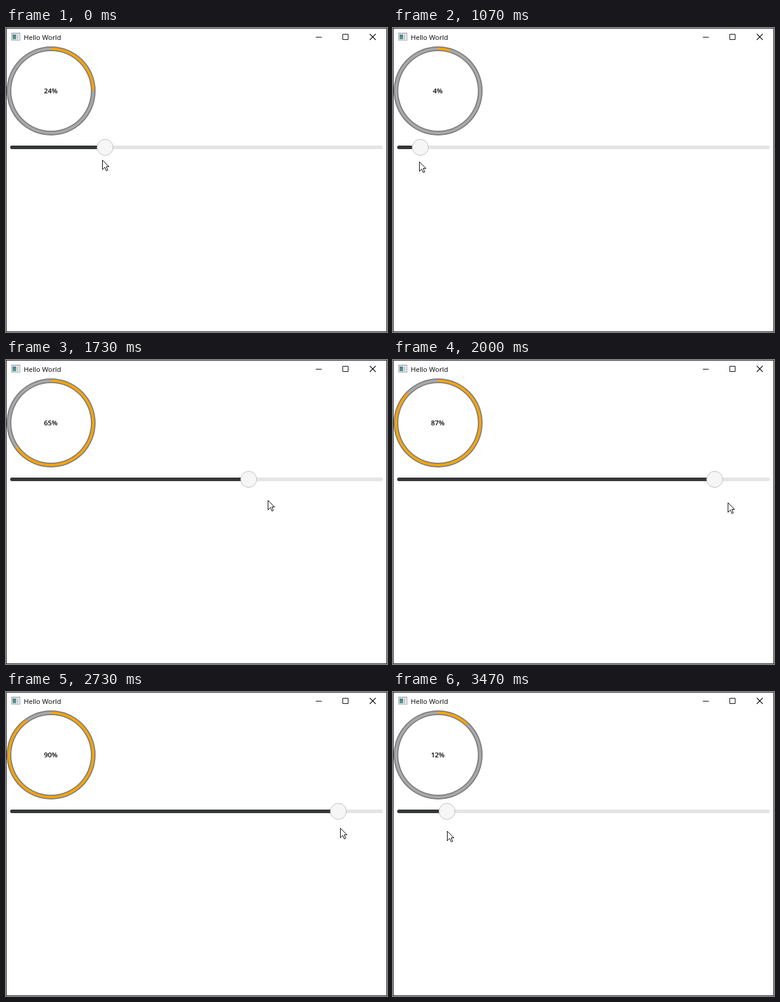
Write an HTML page that moves like this. It is 642 by 512 pixels and loops after 5140 ms.

```html
<!DOCTYPE html>
<html lang="en">
<head>
<meta charset="utf-8">
<title>Hello World</title>
<style>
  html, body { margin: 0; width: 100%; height: 100%; overflow: hidden; background: #fff; }
  #stage { position: absolute; left: 0; top: 0; width: 642px; height: 512px; overflow: hidden; background: #fff; }
  #stage > * { position: absolute; }
  svg { left: 0; top: 0; overflow: visible; }
  .title { left: 30px; top: 8px; font: 11.5px/16px "Open Sans", sans-serif; color: #000; white-space: pre; }
  .ring { left: 1px; top: 31px; width: 150px; height: 150px; border-radius: 50%; background: #808080; }
  .ring div { position: absolute; border-radius: 50%; }
  #arc { inset: 2px; }
  .rim { inset: 6px; background: #808080; }
  .hole { inset: 8px; background: #fff; }
  #label { left: 1px; top: 98px; width: 149px; text-align: center; font: 600 11.5px/16px "Open Sans", sans-serif; color: #000; }
  .track, #fill { left: 7px; top: 198px; width: 628px; height: 6px; border-radius: 3px; background: #e4e4e4; }
  #fill { background: #353637; }
  #knob { left: 7px; top: 187px; width: 28px; height: 28px; box-sizing: border-box; border-radius: 50%; background: #f6f6f6; border: 1px solid #bdbdbd; }
</style>
</head>
<body>
<div id="stage">
  <svg width="642" height="512" fill="none">
    <defs>
      <linearGradient id="pane" x2="0" y2="1">
        <stop stop-color="#4a7f9c"/><stop offset="1" stop-color="#5a9a83"/>
      </linearGradient>
    </defs>
    <rect x=".5" y=".5" width="641" height="511" stroke="#1c1c1c"/>
    <rect x="9.5" y="8.5" width="14" height="12" fill="#f4f6f7" stroke="#9a9fa3"/>
    <path d="M10 9.5H23" stroke="#c5cacd"/>
    <rect x="11" y="11" width="6" height="8" fill="url(#pane)"/>
    <rect x="18" y="11" width="3" height="8" fill="#c3cad0"/>
    <path d="M522 15.5H532M567.5 10.5H576.5V19.5H567.5Z" stroke="#000"/>
    <path d="M613 10L623 20M623 10L613 20" stroke="#000" stroke-width="1.1"/>
  </svg>
  <div class="title">Hello World</div>
  <div class="ring"><div id="arc"></div><div class="rim"></div><div class="hole"></div></div>
  <div id="label"></div>
  <div class="track"></div>
  <div id="fill"></div>
  <div id="knob"></div>
  <svg id="cursor" width="13" height="20">
    <path d="M.5 .5V16.5L4.5 12.5L7 18.5L9.5 17.5L7 11.5H11.5Z" fill="#fff" stroke="#000"/>
  </svg>
</div>
<script>
  const LOOP = 5140, STEP = 200 / 3;
  const [arc, label, fill, knob, cursor] =
    ['arc', 'label', 'fill', 'knob', 'cursor'].map(id => document.getElementById(id));

  // Key poses of the drag: step, slider percent, pointer x, pointer y
  const keys = [
    [0, 24.33, 162, 222], [5, 14.7, 109, 225], [6, 14.7, 109, 225],
    [9, 4.33, 35, 225], [12, 0, 14, 224], [14, 0, 14, 224],
    [22, 39.17, 288, 231], [30, 86.8, 564, 240], [35, 100, 632, 229], [39, 100, 632, 229],
    [46, 36.67, 218, 229], [52, 11.67, 91, 234]
  ];
  const last = keys.length - 1;

  const slope = (c, j) => (keys[j + 1][c] - keys[j][c]) / (keys[j + 1][0] - keys[j][0]);

  function tangent(c, j) {
    if (j === 0) return slope(c, 0);
    if (j === last) return 0;
    const a = slope(c, j - 1), b = slope(c, j);
    return a * b > 0 ? 2 * a * b / (a + b) : 0;
  }

  // Monotone cubic through column c of the key poses
  function curve(c, k) {
    if (k >= keys[last][0]) return keys[last][c];
    const i = keys.findIndex(key => key[0] > k) - 1;
    const [from, to] = [keys[i], keys[i + 1]];
    const h = to[0] - from[0], u = (k - from[0]) / h, w = 1 - u;
    return from[c] * w * w * (1 + 2 * u) + to[c] * u * u * (3 - 2 * u)
      + h * u * w * (tangent(c, i) * w - tangent(c, i + 1) * u);
  }

  // The picture only advances on step times rounded to 10 ms
  function stepAt(t) {
    const k = Math.floor((t + 5) / STEP);
    return Math.round(k * STEP / 10) * 10 > t ? k - 1 : k;
  }

  function draw(k) {
    const v = curve(1, k);
    // A full ring has no solid part left and fades all the way round
    const solid = v < 100 ? v : 0, end = Math.min(v + 1, 100);
    arc.style.background = `conic-gradient(#ffa500 ${solid}%, #a9a9a9 ${end}%)`;
    label.textContent = Math.round(v) + '%';
    fill.style.width = v * 6.28 + 'px';
    knob.style.transform = `translateX(${Math.round(v * 6)}px)`;
    cursor.style.transform = `translate(${Math.round(curve(2, k))}px, ${Math.round(curve(3, k))}px)`;
  }

  const start = performance.now();
  function tick() {
    draw(stepAt((performance.now() - start) % LOOP));
    requestAnimationFrame(tick);
  }
  tick();
</script>
</body>
</html>
```
